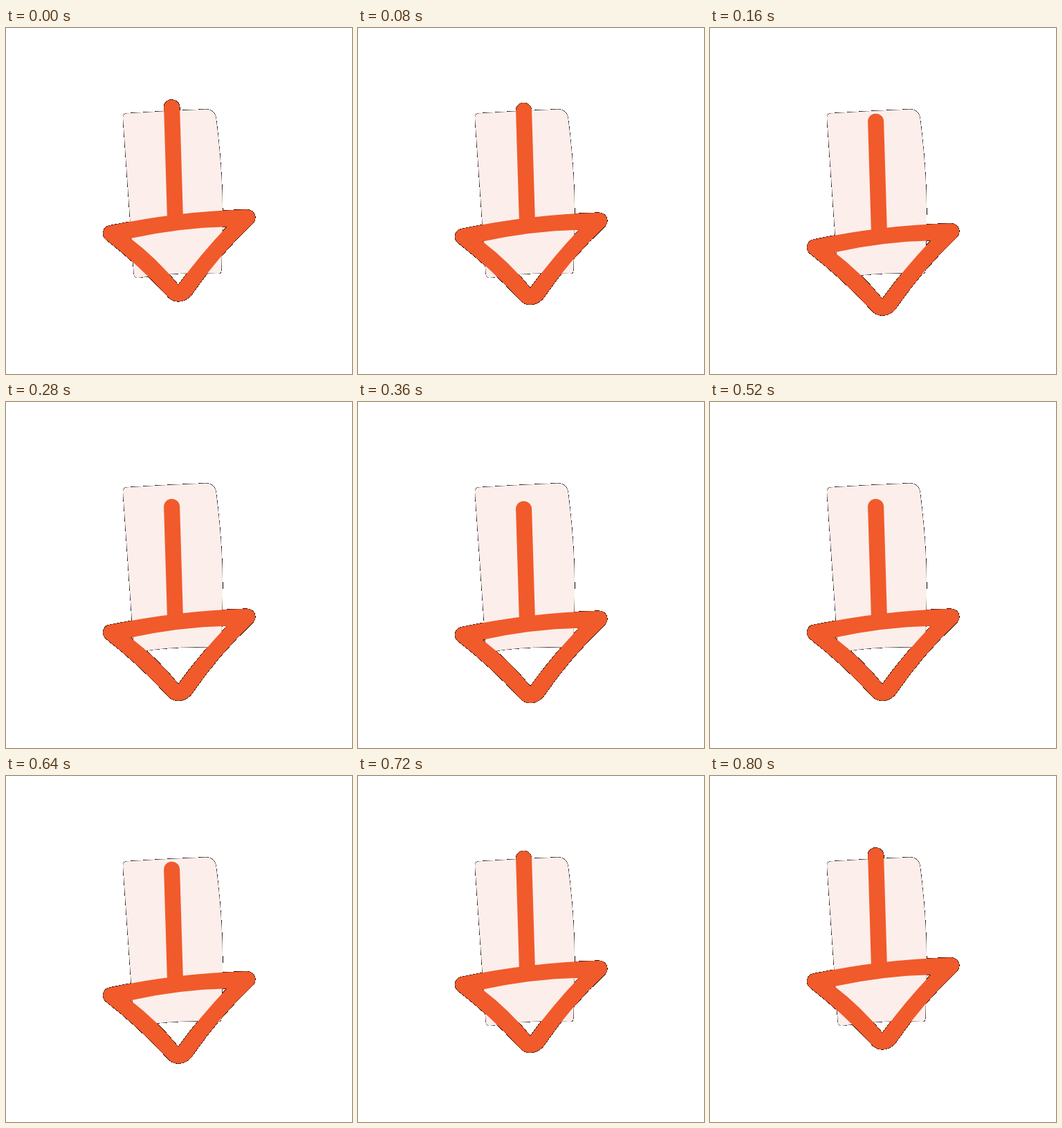
An HTML page with a canvas that plays this animation: 500x500 px, repeating every 0.84 s.

```html
<!DOCTYPE html>
<html lang="en">
<head>
<meta charset="utf-8">
<title>Download arrow</title>
<style>
  html, body { margin: 0; width: 100%; height: 100%; overflow: hidden; background: #fff; }
  canvas { display: block; }
</style>
</head>
<body>
<canvas id="stage" width="500" height="500"></canvas>
<script>
const ctx = document.getElementById('stage').getContext('2d', { willReadFrequently: true });
const LOOP = 840, STEP = 40, HALF = 400, TRAVEL = 40;
const ORANGE = '#f15a2b', PINK = '#fceeeb';

const card = new Path2D(`M175 123.2 Q232 119.7 288 117.5 C296 117 302.7 121.5 303.7 131
  Q315.5 225 312.5 300 L311.3 350 Q310.8 355.2 306 355 Q247 351.8 191 361
  Q185.2 361.4 184.7 355 L169 130 Q168.6 123.6 175 123.2 Z`);

const head = new Path2D(`M149.5 285.6 Q249 264.8 347 262.2 C359 262 364 274 357 282
  Q308 328 270 383 C260 398.2 242 398.7 233 387.3 Q191 342 144 305.3
  C137.3 299 140.3 287 149.5 285.6 Z
  M180 304 Q250 288.7 319 287.2 Q281.5 326.5 249 371 Q218 333 180 304 Z`);

const stem = new Path2D('M239.6 115 L244.6 280');

// Cubic ease with control points (x1, 0) and (x2, 1).
function ease(x, x1 = 0.394, x2 = 0.334) {
  let lo = 0, hi = 1;
  for (let i = 0; i < 24; i++) {
    const u = (lo + hi) / 2, v = 1 - u;
    if (3 * u * v * v * x1 + 3 * u * u * v * x2 + u * u * u < x) lo = u; else hi = u;
  }
  return lo * lo * (3 - 2 * lo);
}

// Blends the soft outer edge into black, leaving a thin dark outline.
function darkenEdge() {
  const image = ctx.getImageData(0, 0, 500, 500), px = image.data;
  for (let i = 0; i < px.length; i += 4) {
    const a = px[i + 3];
    if (a === 0 || a === 255) continue;
    for (let c = 0; c < 3; c++) px[i + c] *= a / 255;
    px[i + 3] = a > 8 ? 255 : 0;
  }
  ctx.putImageData(image, 0, 0);
}

function draw(offset) {
  ctx.clearRect(0, 0, 500, 500);
  ctx.fillStyle = PINK;
  ctx.fill(card);
  ctx.save();
  ctx.translate(0, offset);
  ctx.fillStyle = ctx.strokeStyle = ORANGE;
  ctx.lineWidth = 23;
  ctx.lineCap = 'round';
  ctx.stroke(stem);
  ctx.fill(head, 'evenodd');
  ctx.restore();
  darkenEdge();
}

const start = performance.now();
let shown = -1;
function tick() {
  const t = Math.floor(((performance.now() - start) % LOOP) / STEP) * STEP;
  if (t !== shown) {
    draw(TRAVEL * ease(1 - Math.abs(t - HALF) / HALF));
    shown = t;
  }
  requestAnimationFrame(tick);
}
tick();
</script>
</body>
</html>
```
